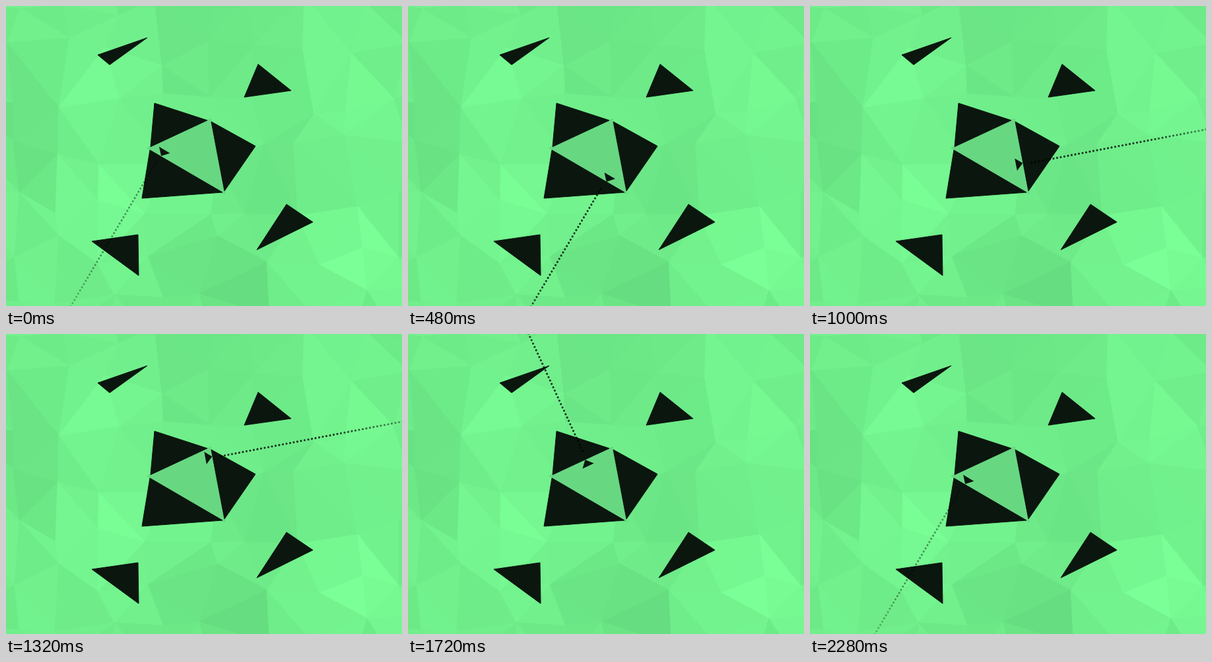
Animation, 600 px wide and 454 px high, one loop 2320 ms. Source, as an HTML page with a canvas:

```html
<!DOCTYPE html>
<html lang="en">
<head>
<meta charset="utf-8">
<title>Triangles</title>
<style>
  html, body { margin: 0; width: 100%; height: 100%; overflow: hidden; background: #6fea8b; }
  canvas { display: block; }
</style>
</head>
<body>
<canvas id="stage" width="600" height="454"></canvas>
<script>
const W = 600, H = 454, FRAME = 40, LOOP = 2320, LAP = 2280;
const CELL = 75, DARK = '#0b160e', HOLE = '#68d782';
const ctx = document.getElementById('stage').getContext('2d');

// Broad light and dark areas of the backdrop: x, y, strength
const lights = [
  [150, 120, 0.7], [160, 305, 0.8], [500, 130, 0.6], [535, 385, 1],
  [20, 190, -1], [280, 50, -0.8], [330, 415, -0.9], [430, 225, -0.7]
];

const shards = [
  [[139, 74], [214, 48], [157, 89]],
  [[382, 88], [432, 128], [361, 138]],
  [[225, 147], [305, 173], [219, 213]],
  [[311, 175], [378, 212], [331, 280]],
  [[218, 218], [328, 282], [206, 291]],
  [[425, 300], [465, 327], [380, 369]],
  [[130, 356], [200, 346], [201, 408]]
];

// The pointer circles the hole; each side has a start and an end time
const hole = [[213.7, 215], [331.8, 285], [310, 170.6]];
const times = [-150, 715, 1415, 2130];

const clamp = v => Math.max(0, Math.min(1, v));

let seed = 7;
function jitter(range) {
  seed = (seed * 16807) % 2147483647;
  return (seed / 2147483647 * 2 - 1) * range;
}

function fillPoly(c, points, color) {
  c.beginPath();
  points.forEach(([x, y]) => c.lineTo(x, y));
  c.closePath();
  c.fillStyle = c.strokeStyle = color;
  c.fill();
  c.stroke();
}

function drawFacet(c, tri) {
  const x = (tri[0][0] + tri[1][0] + tri[2][0]) / 3;
  const y = (tri[0][1] + tri[1][1] + tri[2][1]) / 3;
  const glow = lights.reduce((sum, [lx, ly, power]) =>
    sum + power * Math.exp(-((x - lx) ** 2 + (y - ly) ** 2) / 5000), 0);
  const b = glow + jitter(0.3);
  fillPoly(c, tri, `rgb(${112 + 10 * b}, ${238 + 17 * b}, ${139 + 11 * b})`);
}

// A jittered grid, each cell cut along its shorter diagonal
function drawMesh(c) {
  const grid = [];
  for (let row = 0; row < 9; row++) {
    grid.push([]);
    for (let col = 0; col < 11; col++)
      grid[row].push([(col - 1) * CELL + 5 + jitter(20), (row - 1) * CELL - 5 + jitter(24)]);
  }
  const gap = (p, q) => Math.hypot(p[0] - q[0], p[1] - q[1]);
  for (let row = 0; row < 8; row++)
    for (let col = 0; col < 10; col++) {
      const [p, q] = grid[row].slice(col, col + 2);
      const [s, r] = grid[row + 1].slice(col, col + 2);
      const halves = gap(p, r) < gap(q, s) ? [[p, q, r], [p, r, s]] : [[p, q, s], [q, r, s]];
      halves.forEach(tri => drawFacet(c, tri));
    }
}

const backdrop = document.createElement('canvas');
backdrop.width = W;
backdrop.height = H;
const back = backdrop.getContext('2d');
drawMesh(back);
fillPoly(back, hole, HOLE);
shards.forEach(s => fillPoly(back, s, DARK));

function drawPointer(t) {
  if (t >= times[3]) t -= LAP;
  const side = t < times[1] ? 0 : t < times[2] ? 1 : 2;
  const start = times[side], end = times[side + 1];
  const [ax, ay] = hole[side], [bx, by] = hole[(side + 1) % 3];
  const f = (t - start) / (end - start);

  ctx.save();
  ctx.translate(ax + (bx - ax) * f, ay + (by - ay) * f);
  ctx.rotate(Math.atan2(by - ay, bx - ax));
  ctx.fillStyle = DARK;
  ctx.beginPath();
  ctx.moveTo(-9, -11);
  ctx.lineTo(10, -11);
  ctx.lineTo(0.8, -0.5);
  ctx.fill();

  // Dotted ray on the outer side, fading in and thinning out with distance
  const fade = clamp((t - start - 70) / 160) * clamp((end - t) / 60);
  ctx.fillStyle = '#000';
  for (let d = 13; d < 400; d += 5.6) {
    ctx.globalAlpha = 0.8 * fade * clamp((400 - d) / 220);
    ctx.beginPath();
    ctx.arc(-1.2, d, 1.55, 0, 7);
    ctx.fill();
  }
  ctx.restore();
}

function draw(now) {
  const t = Math.floor(now % LOOP / FRAME) * FRAME % LAP;
  ctx.drawImage(backdrop, 0, 0);
  drawPointer(t);
  requestAnimationFrame(draw);
}
requestAnimationFrame(draw);
</script>
</body>
</html>
```
